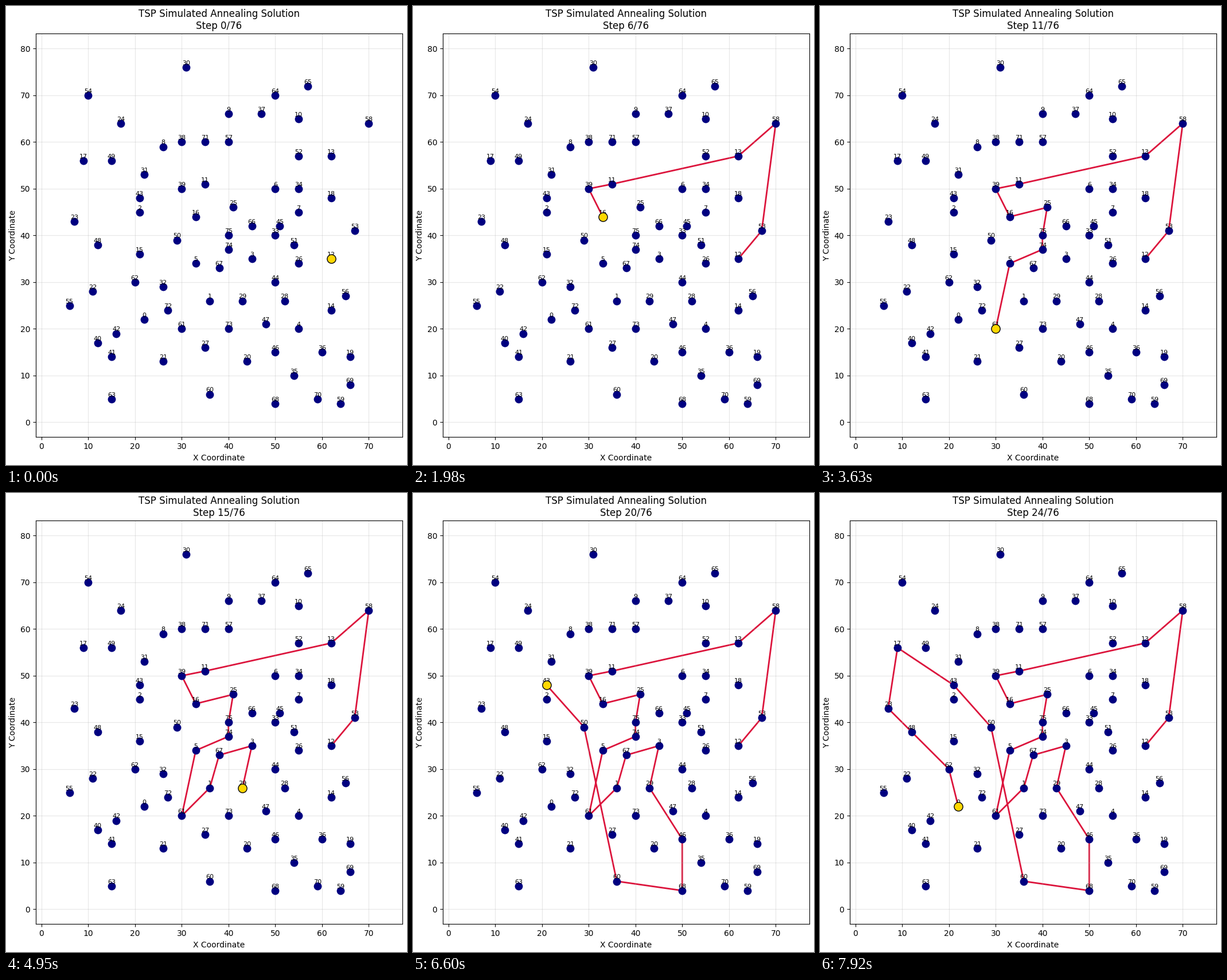
A matplotlib script for the animation above (8 s loop, 699x801 px).

```python
import matplotlib.pyplot as plt
from matplotlib.animation import FuncAnimation

W, H, DPI = 699, 801, 100
LOOP, INTERVAL, HOLD = 8000, 40, 330
TOTAL = 76
PAD = 7.2

# City coordinates, ten cities per row
XS = [22, 36, 21, 45, 55, 33, 50, 55, 26, 40,
      55, 35, 62, 62, 62, 21, 33, 9, 62, 66,
      44, 26, 11, 7, 17, 41, 55, 35, 52, 43,
      31, 22, 26, 50, 55, 54, 60, 47, 30, 30,
      12, 15, 16, 21, 50, 51, 50, 48, 12, 15,
      29, 54, 55, 67, 10, 6, 65, 40, 70, 64,
      36, 30, 20, 15, 50, 57, 45, 38, 50, 66,
      59, 35, 27, 40, 40, 40]
YS = [22, 26, 45, 35, 20, 34, 50, 45, 59, 66,
      65, 51, 35, 57, 24, 36, 44, 56, 48, 14,
      13, 13, 28, 43, 64, 46, 34, 16, 26, 26,
      76, 53, 29, 40, 50, 10, 15, 66, 60, 50,
      17, 14, 19, 48, 30, 42, 15, 21, 38, 56,
      39, 38, 57, 41, 70, 25, 27, 60, 64, 4,
      6, 20, 30, 5, 70, 72, 42, 33, 4, 8,
      5, 60, 24, 20, 37, 40]
ROUTE = [12, 53, 58, 13, 11, 39, 16, 25, 75, 74, 5, 61, 1,
         67, 3, 29, 46, 68, 60, 50, 43, 17, 23, 62, 0]

plt.rcParams["font.family"] = "DejaVu Sans"

# The tiny surplus keeps the pixel size from being truncated
fig = plt.figure(figsize=((W + 1e-3) / DPI, (H + 1e-3) / DPI), dpi=DPI,
                 facecolor="white")
left, right, top, bottom = 52, 691, 48.3, 752.5
ax = fig.add_axes([left / W, 1 - bottom / H,
                   (right - left) / W, (bottom - top) / H])
ax.set_xlim(min(XS) - PAD, max(XS) + PAD)
ax.set_ylim(min(YS) - PAD, max(YS) + PAD)
ax.set_xticks(range(0, 71, 10))
ax.set_yticks(range(0, 81, 10))
ax.set_xlabel("X Coordinate")
ax.set_ylabel("Y Coordinate")
ax.grid(True, alpha=0.3)
title = ax.set_title("")

ax.scatter(XS, YS, s=80, c="navy", zorder=2)
for i, (x, y) in enumerate(zip(XS, YS)):
    ax.text(x, y + 0.5, str(i), fontsize=8, ha="center", zorder=3)

path, = ax.plot([], [], color="crimson", lw=2, zorder=1.5)
current = ax.scatter([0], [0], s=120, c="gold", edgecolors="black", zorder=4)


def update(frame):
    # Each frame shows the step reached by the end of its interval
    step = (frame * INTERVAL + INTERVAL - 1) // HOLD
    visited = ROUTE[:step + 1]
    xs = [XS[c] for c in visited]
    ys = [YS[c] for c in visited]
    path.set_data(xs, ys)
    current.set_offsets([(xs[-1], ys[-1])])
    title.set_text(f"TSP Simulated Annealing Solution\nStep {step}/{TOTAL}")
    return path, current, title


update(0)
anim = FuncAnimation(fig, update, frames=LOOP // INTERVAL, interval=INTERVAL,
                     init_func=lambda: update(0), repeat=True,
                     repeat_delay=0, blit=False)
plt.show()
```
